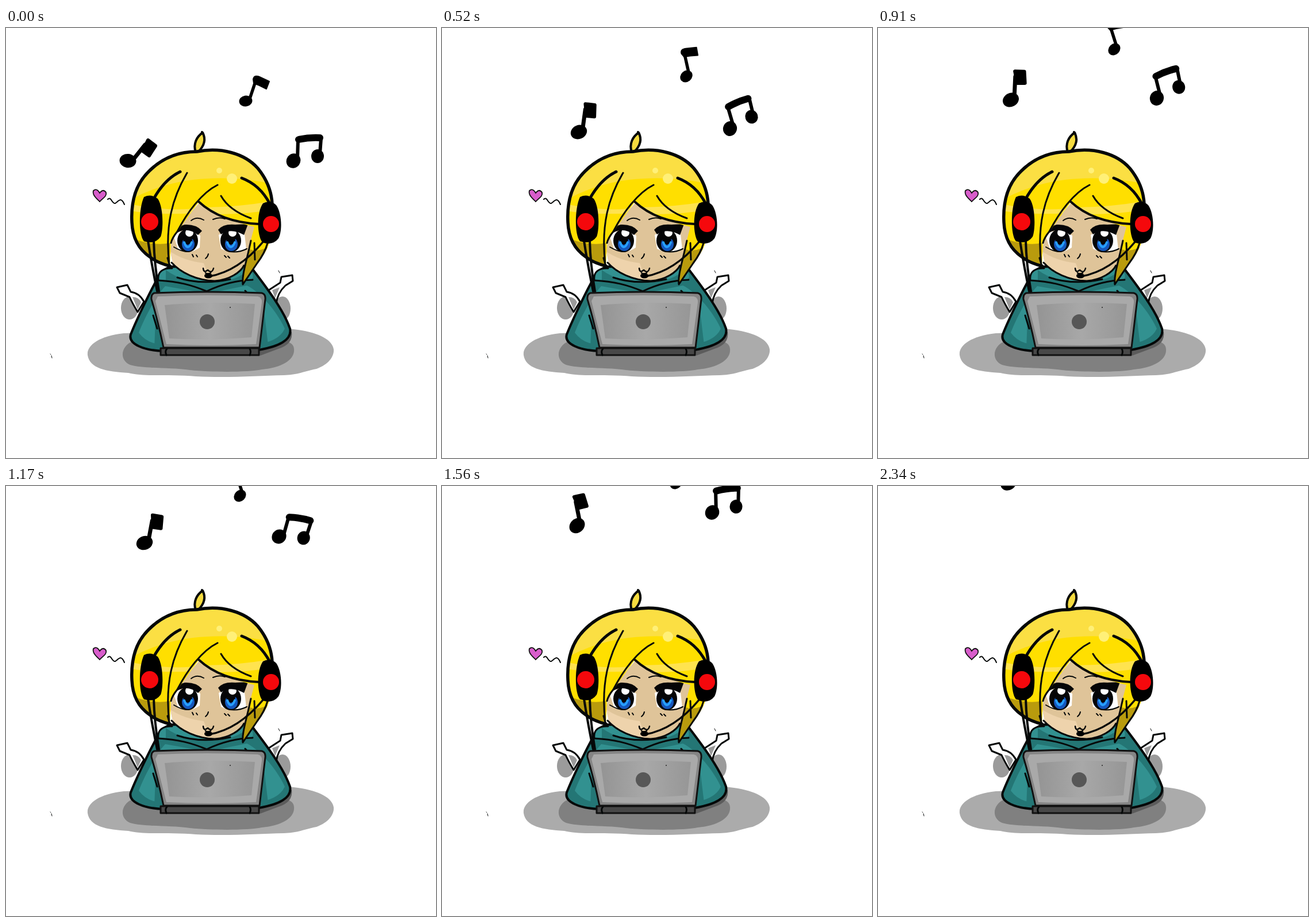
Animation, 748 px wide and 748 px high, one loop 2.47 s. Source, as an HTML page:

```html
<!DOCTYPE html>
<html lang="en">
<head>
<meta charset="utf-8">
<title>Music at the laptop</title>
<style>
html, body { margin: 0; width: 100%; height: 100%; overflow: hidden; background: #fff; }
svg { display: block; width: 100vw; height: 100vh; }
.line { fill: none; stroke: #050808; stroke-linecap: round; stroke-linejoin: round; }
.note { stroke: #000; stroke-linecap: round; stroke-linejoin: round; }
</style>
</head>
<body>
<svg viewBox="0 0 748 748">
<defs>
  <path id="hair" d="M285 414Q262 408 250 398C228 383 220 362 219 338C217 300 226 272 247 251C272 225 302 215 332 215C374 207 415 218 438 244C456 266 462 286 463 306L464 340C464 368 453 391 437 409L412 446C410 430 418 408 422 384L432 346Q380 334 335 303C322 322 298 352 287 374Z"/>
  <clipPath id="inHair"><use href="#hair"/></clipPath>
  <path id="body" d="M270 424C252 455 226 510 217 533C212 550 240 561 275 562L440 560C474 554 498 543 494 523C483 490 449 446 430 421L400 415H285Z"/>
  <clipPath id="inBody"><use href="#body"/></clipPath>
  <linearGradient id="lid" x2="1"><stop stop-color="#949494"/><stop offset=".5" stop-color="#a8a8a8"/><stop offset="1" stop-color="#969696"/></linearGradient>
  <g id="eye">
    <ellipse rx="18" ry="20" fill="#050507"/>
    <ellipse cx="1" cy="6" rx="11" ry="12" fill="#1557bd"/>
    <ellipse cy="-4" rx="8" ry="11" fill="#050507"/>
    <path d="M-6 3Q0 19 7 3" fill="none" stroke="#27a0ff" stroke-width="4" stroke-linecap="round"/>
    <circle cx="3" cy="-14" r="7" fill="#fff"/>
  </g>
</defs>

<!-- floor shadow -->
<path fill="#ababab" d="M205 531C160 536 140 553 142 569C145 592 175 598 213 600C240 607 290 602 330 606C385 609 440 605 483 604C510 603 522 596 540 593C562 585 571 571 570 559C568 540 535 525 485 523Z"/>
<path fill="#808080" d="M220 545C199 554 197 578 216 586C240 593 285 590 320 595C360 599 420 599 445 594C480 591 503 577 501 558Q500 547 485 545Z"/>
<path fill="#5c5c5c" d="M440 560Q480 554 497 528Q500 550 474 558L442 570Z"/>
<ellipse cx="215" cy="487" rx="15" ry="20" fill="#9b9b9b"/>
<ellipse cx="481" cy="488" rx="14" ry="21" fill="#9b9b9b"/>

<!-- legs -->
<g class="line" stroke-width="3">
  <path fill="#fff" d="M193 451L211 447L217 459Q232 461 240 476L229 494Q220 479 215 468L198 461Z"/>
  <path fill="#fff" d="M457 456L477 443L479 433L498 430L499 440L486 448Q472 461 470 480L462 470Z"/>
</g>
<path fill="#9b9b9b" d="M220 468Q231 468 235 477L229 490ZM463 456L476 451L468 470Z"/>
<path class="line" stroke-width="1" d="M474 422l2 4"/>

<!-- hoodie -->
<use href="#body" fill="#247675"/>
<g clip-path="url(#inBody)">
  <path fill="#329190" d="M277 449C259 468 239 509 231 530Q247 552 280 551H430Q474 547 485 523C470 490 440 458 419 448L350 462Z"/>
  <path fill="#247675" d="M260 505L275 525V558H258ZM448 485L438 560L456 551Z"/>
</g>
<use href="#body" class="line" stroke-width="4"/>
<path fill="#329190" d="M265 438C263 422 275 416 292 418L415 414C431 423 432 433 427 438C399 438 373 447 349 458C321 446 292 441 265 438Z"/>
<path fill="#247675" d="M278 421Q308 443 355 443Q403 442 425 417L418 439Q376 444 349 457Q320 445 278 441Z"/>
<path class="line" stroke-width="3" d="M265 438C263 424 274 417 289 418M265 439C300 441 323 447 349 458C374 446 400 439 429 438M298 434Q340 448 390 437M256 500l7 23M416 457l2 2"/>

<!-- face -->
<path fill="#dfc499" d="M338 302L296 350L285 385L290 408C304 426 332 439 363 440C389 438 408 425 417 409L434 345Z"/>
<path fill="#eed3ac" d="M286 389Q310 405 344 409L355 438C327 438 302 426 290 408Z"/>
<path class="line" stroke-width="3" d="M288 408C304 426 332 439 363 440C389 438 408 425 414 413"/>
<path fill="#fff" d="M291 360Q312 345 338 361L337 382Q317 396 299 384ZM370 360Q391 344 415 359L418 385Q391 394 374 384Z"/>
<use href="#eye" x="316" y="370"/>
<use href="#eye" x="391" y="370"/>
<path d="M287 365Q291 347 311 342Q331 341 341 353L334 360Q316 346 298 356ZM369 351Q378 340 399 342L421 341L414 360Q391 347 374 359Z" fill="#050507"/>
<path class="line" stroke-width="2" d="M292 381Q307 390 318 389M389 389Q406 391 419 384M322 335Q332 327 344 334M360 333Q371 328 381 332M324 394l2 4M331 395l2 3M380 396l3 3M386 397l3 3M352 393Q351 398 347 401"/>
<path class="line" stroke-width="2.5" d="M343 418Q344 427 351 421Q358 428 361 418M347 426Q351 429 356 426"/>

<!-- hair -->
<path fill="#f5db3f" class="hairtip" d="M330 216C325 201 332 189 342 182C349 195 343 207 334 216Z" stroke="#050808" stroke-width="4" stroke-linejoin="round"/>
<g clip-path="url(#inHair)">
  <path fill="#ffdf00" d="M210 200H480V450H210Z"/>
  <path fill="#fbdf43" d="M210 200H480V276Q420 258 350 262Q280 265 218 298Z"/>
  <path fill="#ffe34f" d="M215 306Q285 321 345 312Q405 312 470 300V315Q400 328 330 322Q270 326 215 318Z"/>
  <path fill="#b99b0d" d="M215 364Q255 380 285 374V418H215ZM424 385Q443 392 466 374V450H400Z"/>
</g>
<circle cx="371" cy="248" r="5" fill="#fff078"/>
<circle cx="393" cy="262" r="9" fill="#fff078"/>
<path class="line" stroke-width="5.5" d="M285 414Q262 408 250 398C228 383 220 362 219 338C217 300 226 272 247 251C272 225 302 215 332 215C374 207 415 218 438 244C456 266 462 286 463 306"/>
<path class="line" stroke-width="3" d="M455 374Q450 392 437 409L412 446C410 430 418 408 426 370M432 374L433 403M285 414L281 400M315 252C290 294 276 342 284 412M368 273C340 287 315 321 298 354Q289 365 287 374M374 292Q388 317 426 331"/>
<path class="line" stroke-width="4" d="M335 302C360 325 395 339 440 341M341 181L343 184"/>

<!-- headset -->
<path class="line" stroke-width="5" d="M303 250Q276 263 257 297M410 261Q442 273 459 306"/>
<path class="line" stroke-width="4" d="M247 370Q253 410 263 458M257 370Q258 410 266 458"/>
<path class="line" stroke-width="3.5" d="M448 371Q405 423 354 432"/>
<ellipse cx="352" cy="431" rx="7" ry="4.5"/>
<path d="M240 294Q253 288 264 297C274 311 274 351 269 363Q259 377 240 371C230 359 231 313 240 294ZM447 305Q460 299 470 308C480 322 481 353 474 366Q464 379 446 373C436 360 436 320 447 305Z"/>
<circle cx="250" cy="337" r="15" fill="#f5080c"/>
<circle cx="461" cy="341" r="14" fill="#f5080c"/>

<!-- laptop -->
<path fill="#484848" stroke="#111" stroke-width="3" stroke-linejoin="round" d="M269 557H440V569H269Z"/>
<path class="line" stroke-width="3" d="M280 558Q276 562 279 569M424 558Q427 563 424 569"/>
<path fill="#858585" stroke="#111" stroke-width="3" stroke-linejoin="round" d="M258 461Q350 457 445 461Q452 463 451 472L441 556H274Q265 512 253 472Q252 463 258 461Z"/>
<path fill="#a9a9a9" d="M264 467Q350 463 438 467Q446 469 445 478L435 550Q354 554 279 550Q268 507 260 475Z"/>
<path fill="url(#lid)" d="M276 482Q350 475 433 480L427 538Q354 544 284 540Z"/>
<circle cx="350" cy="511" r="13" fill="#575757"/>
<circle cx="390" cy="486" r="1" fill="#222"/>

<!-- heart and specks -->
<path fill="#d85dcb" stroke="#111" stroke-width="1.8" d="M163 302C156 295 150 290 152 283Q158 278 163 287Q169 279 174 286C176 293 168 296 163 302Z"/>
<path class="line" stroke-width="2" d="M177 298C183 292 184 306 190 305C196 301 200 293 206 307"/>
<path class="line" stroke-width="1" d="M77 567l1 1M79 570l1 4"/>

<!-- notes, each centred on its left head -->
<g class="note" stroke-width="0">
  <ellipse rx="14.5" ry="12" transform="rotate(8)"/>
  <path stroke-width="7" d="M10 -3L30 -28"/>
  <path stroke-width="6" d="M35 -36L48 -26L37 -9L26 -17Z"/>
</g>
<g class="note" stroke-width="0">
  <ellipse rx="11.5" ry="9.5" transform="rotate(-10)"/>
  <path stroke-width="5.5" d="M7 -4L18 -37"/>
  <path stroke-width="2" d="M13 -38Q15 -46 24 -42L41 -34L36 -21L24 -27L14 -31Z"/>
</g>
<g class="note" stroke-width="0">
  <ellipse rx="12" ry="13" transform="rotate(35)"/>
  <ellipse cx="42" cy="-8" rx="11" ry="12"/>
  <path stroke-width="6" d="M7 -4L8 -37M46 -12L48 -39"/>
  <path stroke-width="12" d="M9 -37Q28 -41 46 -40"/>
</g>
</svg>
<script>
const STEP = 130, LOOP = 2470;
// per note: [step, x, y, turn in degrees]
const paths = [
  [[0, 212, 231, 0], [4, 238, 181, -31], [6, 228, 143, -35], [7, 231, 125, -36],
   [9, 241, 99, -28], [12, 235, 69, -50], [14, 230, 35, -42], [18, 227, -5, -42]],
  [[0, 417, 127, 0], [4, 425, 84, -31], [5, 421, 63, -33], [7, 411, 37, -36],
   [9, 407, 17, -36], [12, 407, -5, -36], [14, 406, -25, -36], [18, 404, -65, -36]],
  [[0, 500, 231, 0], [4, 501, 175, -18], [7, 485, 122, -16], [9, 475, 88, 14],
   [12, 470, 46, -3], [14, 464, 15, 0], [15, 465, 1, 0], [18, 460, -40, 0]]
];
const notes = document.querySelectorAll('.note');

function pose(keys, step) {
  const i = Math.max(1, keys.findIndex(k => k[0] >= step));
  const a = keys[i - 1], b = keys[i];
  const u = (step - a[0]) / (b[0] - a[0]);
  return a.map((v, j) => v + (b[j] - v) * u);
}

function draw() {
  const step = Math.floor(performance.now() % LOOP / STEP);
  notes.forEach((note, n) => {
    const [, x, y, turn] = pose(paths[n], step);
    note.setAttribute('transform', `translate(${x} ${y}) rotate(${turn})`);
  });
  requestAnimationFrame(draw);
}
draw();
</script>
</body>
</html>
```
